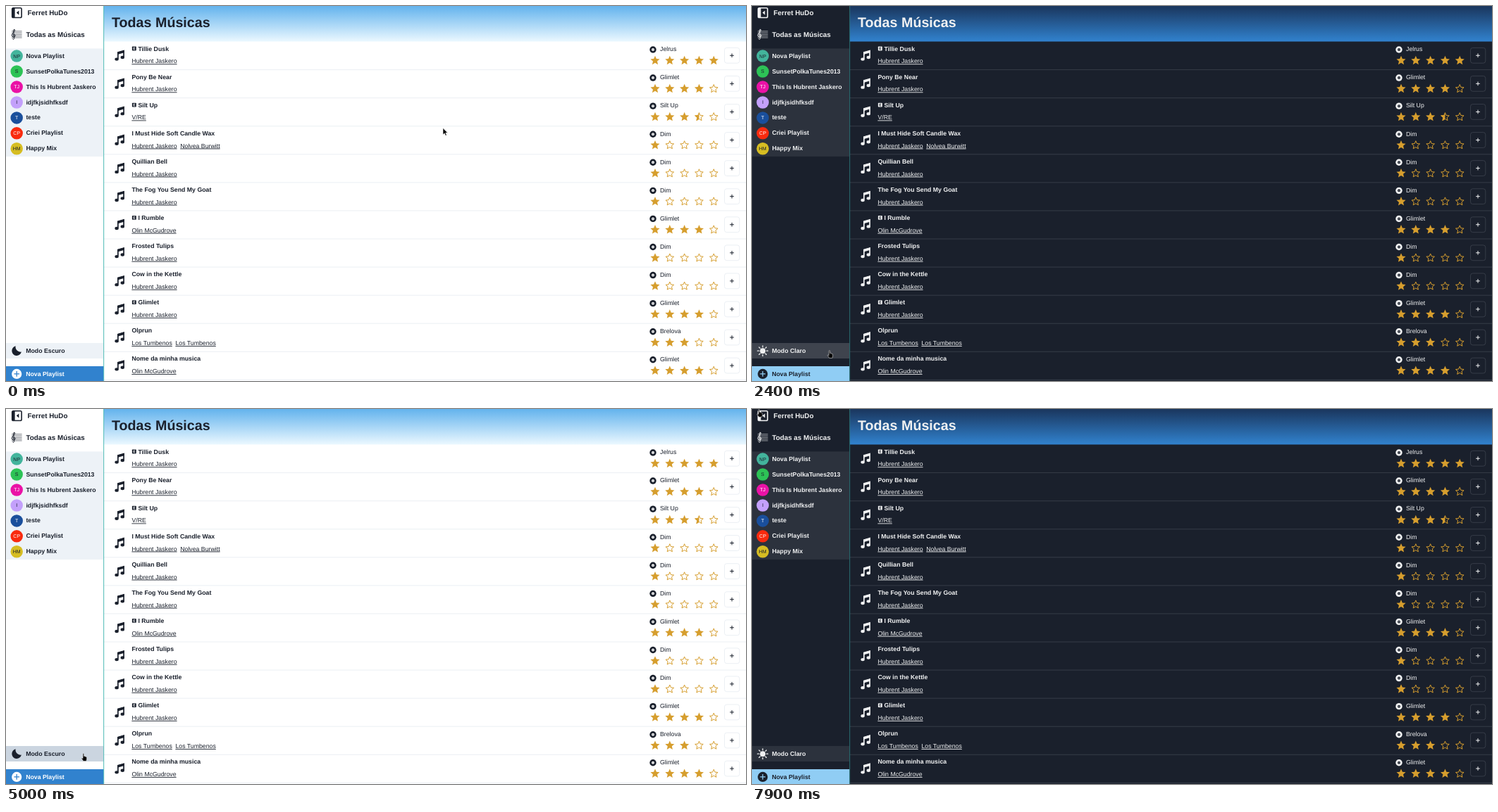
These frames come from a looping animation (1050 px wide and 533 px high, 8000 ms). An HTML page:

```html
<!DOCTYPE html>
<html lang="pt">
<head>
<meta charset="utf-8">
<title>Todas Músicas</title>
<style>
  html, body { margin: 0; width: 100%; height: 100%; overflow: hidden; }
  svg {
    display: block; width: 100vw; height: 100vh;
    font: 8.75px "Liberation Sans", Arial, sans-serif;
    text-rendering: geometricPrecision;
    --bg: #fff; --ink: #1a202c; --list: #edf2f7; --rule: #e2e8f0; --edge: #38b2ac;
    --top: #63b3ed; --low: #ebf8ff; --accent: #3182ce; --onAccent: #fff;
  }
  svg.dark {
    --bg: #1a202c; --ink: #f0f1f2; --list: #2c323d; --rule: #434853; --edge: #2c7a7b;
    --top: #1a365d; --low: #3182ce; --accent: #90cdf4; --onAccent: #1a202c;
  }
  .bg { fill: var(--bg); }
  .ink { fill: var(--ink); }
  .list { fill: var(--list); }
  .accent { fill: var(--accent); }
  .onAccent { fill: var(--onAccent); }
  .line { fill: none; stroke: var(--ink); }
  .rule { fill: none; stroke: var(--rule); stroke-width: .7; }
  .gold { fill: #d69e2e; }
  .hollow { fill: none; stroke: #d69e2e; stroke-width: 1; stroke-linejoin: round; }
  .link { text-decoration: underline; }
  text { white-space: pre; }
  .bold { font-weight: bold; }
  .big { font-size: 9.84px; }
  .mini .label, .mini #arrow, .dark .day, svg:not(.dark) .night { display: none; }
  .mini #main { transform: translateX(-101px); }
</style>
</head>
<body>
<svg id="stage" viewBox="0 0 1050 533" preserveAspectRatio="none"></svg>
<script>
const ROW = 40.07, ITEM = 21.95;
const lead = "Hubrent Jaskero", second = "Olin McGudrove";
// title, artists, album, rating, explicit
const songs = [
  ["Tillie Dusk", [lead], "Jelrus", 5, 1],
  ["Pony Be Near", [lead], "Glimlet", 4],
  ["Silt Up", ["V/RE"], "Silt Up", 3.5, 1],
  ["I Must Hide Soft Candle Wax", [lead, "Nolvea Burwitt"], "Dim", 1],
  ["Quillian Bell", [lead], "Dim", 1],
  ["The Fog You Send My Goat", [lead], "Dim", 1],
  ["I Rumble", [second], "Glimlet", 4, 1],
  ["Frosted Tulips", [lead], "Dim", 1],
  ["Cow in the Kettle", [lead], "Dim", 1],
  ["Glimlet", [lead], "Glimlet", 4, 1],
  ["Olprun", ["Los Tumbenos", "Los Tumbenos"], "Brelova", 3],
  ["Nome da minha musica", [second], "Glimlet", 4]
];
// name, initials, colour, initials colour
const playlists = [
  ["Nova Playlist", "NP", "#43b49c", "#1a202c"],
  ["SunsetPolkaTunes2013", "S", "#2dc356", "#1a202c"],
  ["This Is " + lead, "TJ", "#ea12a6", "#fff"],
  ["idjfkjsidhfksdf", "I", "#c3a0fb", "#1a202c"],
  ["teste", "T", "#1a4f9c", "#fff"],
  ["Criei Playlist", "CP", "#f92a0e", "#fff"],
  ["Happy Mix", "HM", "#d6bd22", "#1a202c"]
];

const text = (x, y, s, cls = "ink") => `<text x="${x}" y="${y}" class="${cls}">${s}</text>`;
const label = (x, y, s, cls = "ink") => text(x, y, s, "label bold " + cls);
const rect = (x, y, w, h, cls, more = "") =>
  `<rect x="${x}" y="${y}" width="${w}" height="${h}" class="${cls}" ${more}/>`;
const circle = (x, y, r, cls, more = "") =>
  `<circle cx="${x}" cy="${y}" r="${r}" class="${cls}" ${more}/>`;
const path = (d, cls, more = "") => `<path d="${d}" class="${cls}" ${more}/>`;
const at = (x, y, body, more = "") => `<g transform="translate(${x} ${y})" ${more}>${body}</g>`;
const each = (n, f) => Array.from({ length: n }, (_, i) => f(i)).join("");

// Star outline from the top clockwise; the left half uses points 5 to 10
function starPath(R, from = 0) {
  let d = "";
  for (let k = from; k <= 10; k++) {
    const a = k * Math.PI / 5, r = k % 2 ? R * .46 : R;
    d += (d ? "L" : "M") + (r * Math.sin(a)).toFixed(2) + " " + (-r * Math.cos(a)).toFixed(2);
  }
  return d + "Z";
}

function star(i, rating) {
  const left = rating - i;
  const body = left >= 1 ? path(starPath(6.9), "gold")
    : path(starPath(6.1), "hollow") + (left > 0 ? path(starPath(6.6, 5), "gold") : "");
  return at(921 + 20.82 * i, 77.6, body);
}

const note =
  path("M158.9 75V66.3L167.1 64V72.6", "line", 'stroke-width="1.7"') +
  path("M158.1 65.2L168 62.4V66.2L158.1 69Z", "ink") +
  `<ellipse cx="157.1" cy="75.6" rx="2.7" ry="2.2" class="ink"/>` +
  `<ellipse cx="165.3" cy="73" rx="2.7" ry="2.2" class="ink"/>`;

const badge = rect(178.9, 57.5, 5.9, 5.9, "ink", 'rx=".8"') +
  path("M183.1 58.9H181V62H183.1M181 60.45H182.9", "", 'fill="none" stroke="var(--bg)" stroke-width=".7"');

function songLeft([title, artists, , , explicit], i) {
  const links = artists.map((a, k) => `<tspan class="link" dx="${k ? 4.6 : 0}">${a}</tspan>`).join("");
  return at(0, i * ROW, note + (explicit ? badge : "") +
    text(explicit ? 187.4 : 178.4, 63.7, title, "ink bold") + text(178.4, 81.3, links) +
    path("M139 90.6H1152", "rule"));
}

function songRight([, , album, rating], i) {
  return at(0, i * ROW,
    circle(918, 62, 4.7, "ink") + circle(918, 62, 2, "bg") + circle(918, 62, .6, "ink") +
    text(928, 64.3, album) + each(5, k => star(k, rating)) +
    rect(1019.5, 59.4, 21.3, 21.8, "rule", 'rx="3.2"') +
    path("M1027.2 70.3H1032.8M1030 67.5V73.1", "line"));
}

const playlist = ([name, initials, color, ink], i) => at(0, i * ITEM,
  circle(15.2, 71.1, 8.75, "", `fill="${color}"`) +
  `<text x="15.2" y="73.5" font-size="7" text-anchor="middle" fill="${ink}">${initials}</text>` +
  label(28.4, 73.7, name));

const panelIcon = rect(8.7, 2.7, 13.4, 13.8, "line", 'rx="1.8" stroke-width="1.6"') +
  rect(8.6, 2.7, 4, 13.8, "ink", 'rx="1"') +
  path("M14.8 9.6L18.4 6.5V12.7Z", "ink", 'id="arrow"');

const clefIcon =
  each(5, i => path(`M8 ${35.8 + i * 2.3}H22.6`, "line", 'stroke-width=".6"')) +
  path("M9.3 46.6Q11.6 48.6 11.6 45.4L10.6 35Q11 32.2 12.5 33.6Q13.2 36 9.4 39Q6.7 42 9.6 44Q13.6 44.6 13.2 41.6Q11.6 39.3 10 41.6", "line", 'stroke-width="1"');

const moon = path("M13.6 483.3A6.9 6.9 0 1 0 21.9 491.6A7.2 7.2 0 0 1 13.6 483.3Z", "ink day");
const sun = at(15.2, 490.2, circle(0, 0, 3.9, "ink") +
  each(8, i => path("M0 -5.4V-7.4", "line", `stroke-width="1.3" stroke-linecap="round" transform="rotate(${i * 45})"`)),
  'class="night"');

const pointer = path("M0 0V9.4L2.2 7.4L3.7 10.8L5.3 10.1L3.8 6.8H6.7Z", "",
  'id="pointer" fill="#000" stroke="#fff" stroke-width=".6"');
const hand = path("M2.1 6.8V1.1Q2.9 -.1 3.7 1.1V4.5Q4.6 4 5.1 4.9Q6 4.5 6.4 5.4Q7.5 5.2 7.6 6.3V8.6Q7.6 10 6.8 11.4H2.7Q1.6 9.6 .2 7.7Q.2 6.2 2.1 7.6Z", "",
  'id="hand" fill="#000" stroke="#fff" stroke-width=".5"');

const stage = document.getElementById("stage");
stage.innerHTML = `
  <linearGradient id="sky" x2="0" y2="1">
    <stop stop-color="var(--top)"/><stop offset="1" stop-color="var(--low)"/>
  </linearGradient>` +
  rect(0, 0, 1050, 533, "bg") +
  panelIcon + label(30.6, 12.7, "Ferret HuDo", "ink big") +
  clefIcon + label(28.4, 43.6, "Todas as Músicas", "ink big") +
  rect(0, 60.4, 139, 153.5, "list") + playlists.map(playlist).join("") +
  rect(0, 479, 139, 22, "", 'id="mode"') + moon + sun +
  label(28.2, 492.8, "Modo Escuro", "ink day") + label(28.2, 492.8, "Modo Claro", "ink night") +
  rect(0, 512, 139, 21, "accent") + circle(15.2, 522.9, 7.1, "onAccent") +
  path("M11.4 522.9H19M15.2 519.1V526.7", "", 'stroke="var(--accent)" stroke-width="1.3"') +
  label(28.2, 525.8, "Nova Playlist", "onAccent") +
  `<g id="main">` + rect(138.5, 0, 1013, 533, "bg") +
  rect(139, 0, 1013, 50.5, "", 'fill="url(#sky)"') +
  `<text x="150" y="30" class="ink bold" font-size="19.69">Todas Músicas</text>` +
  songs.map(songLeft).join("") + path("M138.7 0V533", "", 'stroke="var(--edge)" stroke-width=".9"') +
  `</g>` + songs.map(songRight).join("") +
  `<g id="cursor">${pointer + hand}</g>`;

const $ = id => document.getElementById(id);
const unit = v => Math.max(0, Math.min(1, v));
const mix = (a, b, k) => `rgb(${a.map((v, i) => Math.round(v + (b[i] - v) * k))})`;
// first and last step in ms, then the point reached
const moves = [[200, 800, 173, 383], [1100, 1600, 107, 489], [5300, 5900, 7, 0]];
const rest = [237, 242, 247], hover = [226, 232, 240], pressed = [203, 213, 224];

function cursorAt(t) {
  let x = 620, y = 173.5;
  for (const [start, end, tx, ty] of moves) {
    const p = unit((t - start + 100) / (end - start + 100)), k = p * p * (3 - 2 * p);
    x += (tx - x) * k;
    y += (ty - y) * k;
  }
  return [x, y];
}

function modeFill(t, dark, over) {
  if (dark) return over ? "#3f444e" : "#2c323d";
  const press = t < 2400 ? unit((t - 1900) / 300) : unit((t - 4700) / 300);
  return press ? mix(hover, pressed, press) : mix(rest, hover, over ? 1 : 0);
}

function draw(now) {
  const t = Math.floor(now % 8000 / 100) * 100;
  const dark = t >= 2400 && t < 3900 || t >= 5100;
  const [x, y] = cursorAt(t);
  const over = x < 139 && y > 477 && y < 501;
  const onLink = over || x < 139 && y < 214;
  stage.classList.toggle("dark", dark);
  stage.classList.toggle("mini", t >= 6300 && t < 7900);
  $("mode").setAttribute("fill", modeFill(t, dark, over));
  $("cursor").setAttribute("transform", `translate(${x} ${y})`);
  $("hand").style.display = onLink ? "" : "none";
  $("pointer").style.display = onLink ? "none" : "";
}

const begin = performance.now();
function tick() {
  draw(performance.now() - begin);
  requestAnimationFrame(tick);
}
tick();
</script>
</body>
</html>
```
